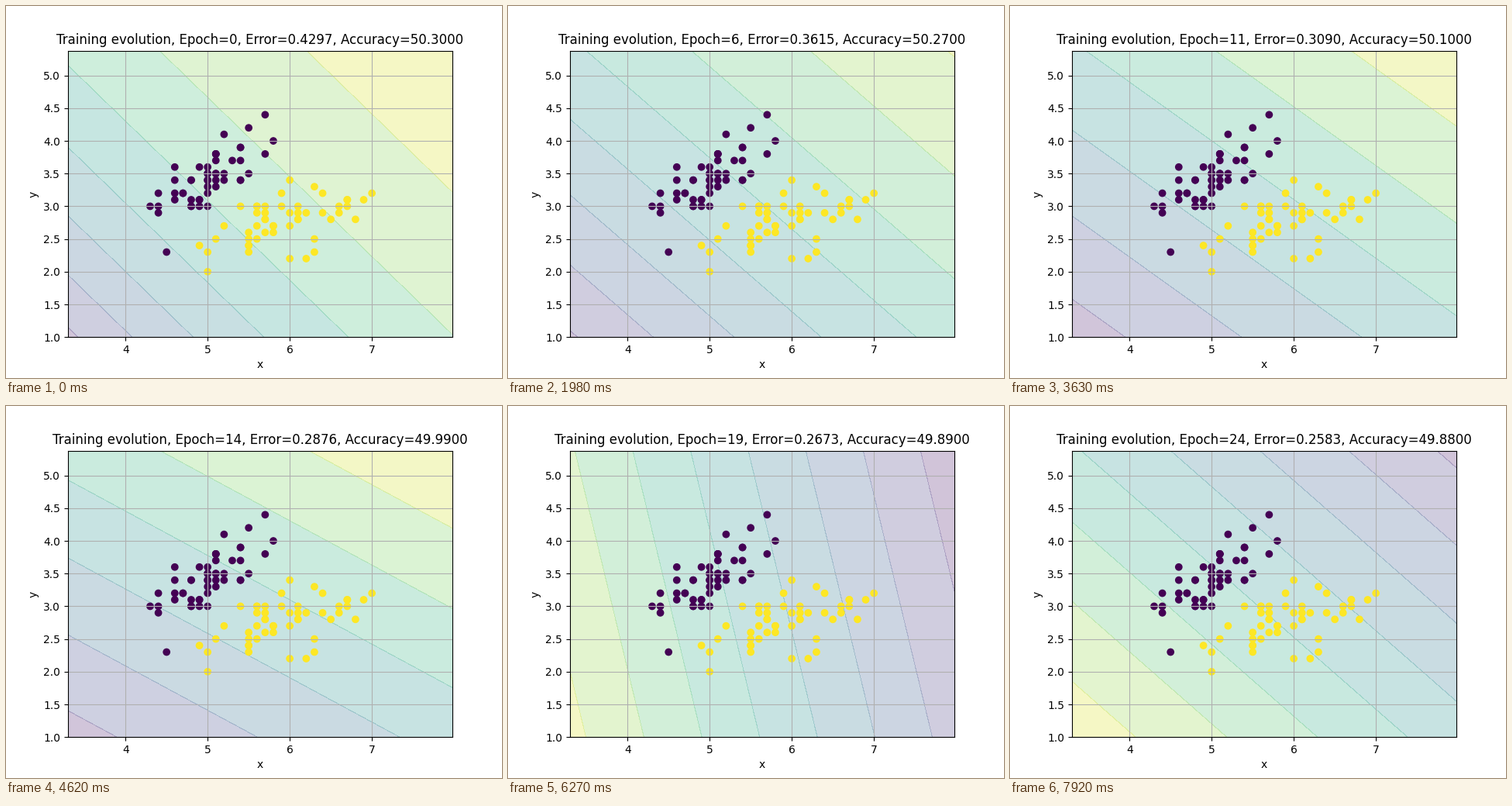
These frames come from a looping animation (640x480 px, 8 s). A matplotlib script:

```python
import numpy as np
import matplotlib.pyplot as plt
from matplotlib.animation import FuncAnimation

plt.rcParams["font.family"] = "DejaVu Sans"

# Iris sepal measurements: width -> lengths
SETOSA = {
    2.3: [4.5], 2.9: [4.4],
    3.0: [4.9, 4.8, 4.3, 5.0, 4.4, 4.8],
    3.1: [4.6, 4.9, 4.8, 4.9],
    3.2: [4.7, 4.7, 5.0, 4.4, 4.6],
    3.3: [5.1, 5.0],
    3.4: [4.6, 5.0, 4.8, 5.4, 4.8, 5.0, 5.2, 5.4, 5.1],
    3.5: [5.1, 5.1, 5.2, 5.5, 5.0, 5.0],
    3.6: [5.0, 4.6, 4.9],
    3.7: [5.4, 5.1, 5.3],
    3.8: [5.7, 5.1, 5.1, 5.1],
    3.9: [5.4, 5.4],
    4.0: [5.8], 4.1: [5.2], 4.2: [5.5], 4.4: [5.7],
}
VERSICOLOR = {
    2.0: [5.0],
    2.2: [6.0, 6.2],
    2.3: [5.5, 6.3, 5.0],
    2.4: [4.9, 5.5, 5.5],
    2.5: [5.6, 6.3, 5.5, 5.1],
    2.6: [5.7, 5.5, 5.8],
    2.7: [5.2, 5.8, 5.8, 6.0, 5.6],
    2.8: [6.5, 5.7, 6.1, 6.1, 6.8, 5.7],
    2.9: [6.6, 6.1, 5.6, 6.4, 6.0, 5.7, 6.2],
    3.0: [5.9, 5.6, 6.6, 6.7, 5.4, 5.6, 6.1, 5.7],
    3.1: [6.9, 6.7, 6.7],
    3.2: [7.0, 6.4, 5.9],
    3.3: [6.3], 3.4: [6.0],
}

LOOP, STEP, HOLD = 8000, 50, 330  # ms
EPOCHS = 25
RATE = 0.01
START = np.array([0.23812, 0.19566, 0.648])  # weights for x, y and bias


def points(table):
    return [(x, y, 1.0) for y, xs in table.items() for x in xs]


def predict(w, x, y):
    return 1 / (1 + np.exp(-(w[0] * x + w[1] * y + w[2])))


def train(data, target):
    """Logistic regression by full-batch gradient descent."""
    w, history = START.copy(), []
    for _ in range(EPOCHS):
        p = predict(w, data[:, 0], data[:, 1])
        error = np.mean((target - p) ** 2)
        accuracy = 100 * round(1 - np.mean(np.abs(target - p)), 4)
        history.append((w.copy(), error, accuracy))
        w -= RATE * data.T @ (p - target) / len(target)
    return history


first, second = points(SETOSA), points(VERSICOLOR)
data = np.array(first + second)
target = np.repeat([0.0, 1.0], [len(first), len(second)])
history = train(data, target)

gx, gy = np.meshgrid(np.linspace(3.3, 7.98, 235), np.linspace(1, 5.38, 220))

fig, ax = plt.subplots(figsize=(6.4, 4.8), dpi=100)
ax.scatter(data[:, 0], data[:, 1], c=target, cmap="viridis")
ax.set(xlim=(3.3, 7.98), ylim=(1, 5.38), xlabel="x", ylabel="y")
ax.grid(True)
title = ax.set_title("")
shown = {"epoch": None, "field": None}


def update(i):
    epoch = min((i * STEP + STEP - 1) // HOLD, EPOCHS - 1)
    if epoch == shown["epoch"]:
        return
    if shown["field"] is not None:
        shown["field"].remove()
    w, error, accuracy = history[epoch]
    shown["field"] = ax.contourf(gx, gy, predict(w, gx, gy), cmap="viridis",
                                 alpha=0.25, zorder=0.5)
    shown["epoch"] = epoch
    title.set_text(f"Training evolution, Epoch={epoch}, "
                   f"Error={error:.4f}, Accuracy={accuracy:.4f}")


anim = FuncAnimation(fig, update, frames=LOOP // STEP, interval=STEP,
                     repeat=True, repeat_delay=0)
plt.show()
```
